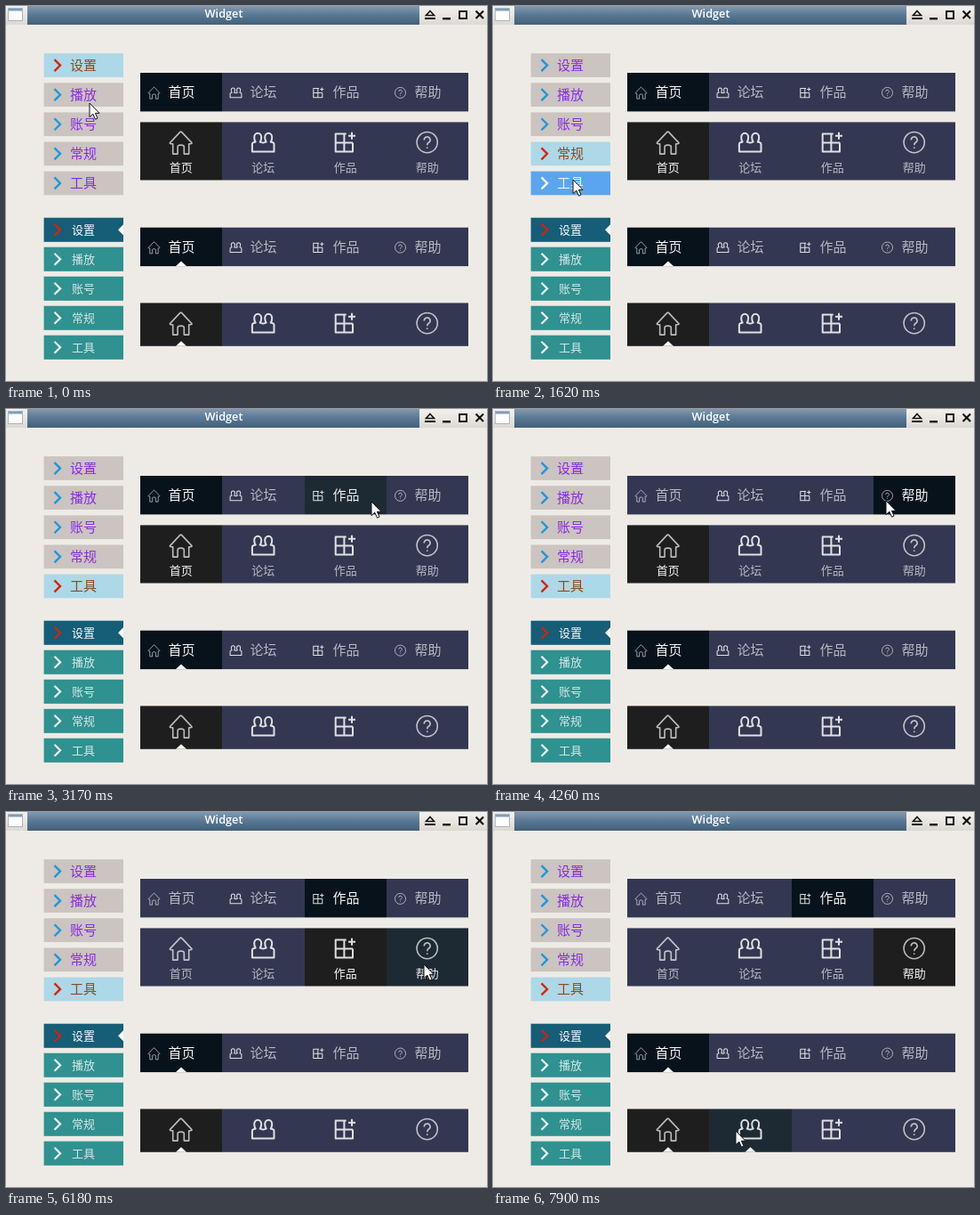
Recreate the animation shown at these times as an HTML page with a canvas. Size 541 by 421 pixels, loop 8 s.

```html
<!DOCTYPE html>
<html lang="zh-CN">
<head>
<meta charset="utf-8">
<title>Widget</title>
<style>
html, body { margin: 0; width: 100%; height: 100%; overflow: hidden; background: #eeebe6; }
canvas { display: block; }
</style>
</head>
<body>
<canvas id="stage" width="541" height="421"></canvas>
<script>
const ctx = document.getElementById('stage').getContext('2d');
const LOOP = 8000, STEP = 77.4, PHASE = 13;
const CLICK_DELAY = 2; // steps between arriving and the press taking effect
const CJK = '"Noto Sans CJK SC", "Noto Sans CJK", "Noto Sans CJK JP", sans-serif';
const NOTCH = '#fbfaf8';

const LIST = ['设置', '播放', '账号', '常规', '工具'];
const MENU = ['首页', '论坛', '作品', '帮助'];

// Icons live in a box of about 26 units around the origin
const soft = 'rgba(255,255,255,.7)', bright = 'rgba(255,255,255,.85)';
const ICONS = [
  { ink: soft, width: 1.6, d: 'M-12.3 .5L-1 -11.5Q0 -12.4 1 -11.5L12.3 .5Q12.6 1.8 9 1.8V13H3.6V5Q3.6 3 0 3Q-3.6 3 -3.6 5V13H-9V1.8Q-12.6 1.8 -12.3 .5Z' },
  { ink: bright, width: 2, d: 'M-12.3 10.3V2Q-12.3 .5 -11 .2L-8.5 -.5Q-10 -2.5 -10 -5.5A4 4.8 0 0 1 -2 -5.5Q-2 -2.5 -3.5 -.5L0 .5L3.5 -.5Q2 -2.5 2 -5.5A4 4.8 0 0 1 10 -5.5Q10 -2.5 8.5 -.5L11 .2Q12.3 .5 12.3 2V10.3Z' },
  { ink: bright, width: 2, d: 'M1 -9.5H-11V10.3H8.3V.3M-1.3 -9.5V10.3M-11 .3H8.3M7.3 -11.3V-3.3M3.3 -7.3H11.3' },
  { ink: soft, width: 1.6, d: 'M11.6 0A11.6 11.6 0 1 1 -11.6 0A11.6 11.6 0 1 1 11.6 0M-3.4 -2.6A3.4 3.4 0 1 1 1.6 .2Q0 1.2 0 3.2M0 5.4V7' }
].map(icon => ({ ...icon, path: new Path2D(icon.d) }));
const ARROW = new Path2D('M0 0V15.6L3.8 12.2L6.5 18.2L9 17L6.4 11.3H11Z');

// Style arrays run: idle, hovered, selected
const TEXT = ['#b7b9c4', '#ecedef', '#f4f5f6'];
const BLUE = ['#333751', '#1e2a33', '#07121b'];
const GREY = ['#333751', '#1e2a33', '#1e1e1e'];

function list(y, h, pitch, style) {
  const cells = LIST.map((text, i) => ({ text, x: 42.6, y: y + i * pitch, w: 89.4, h }));
  return { cells, picks: [], draw: drawListItem, ...style };
}

function bar(y, h, layout, bg, notch) {
  const edge = i => 151 + Math.round(i * 92.25);
  const cells = MENU.map((text, i) => ({ text, x: edge(i), y, w: edge(i + 1) - edge(i), h }));
  return { cells, picks: [], draw: drawBarItem, layout, bg, notch };
}

const PANELS = [
  list(53.2, 26.7, 33.1, {
    size: 15, indent: 29.4, bg: ['#cbc4c0', '#5ba5ef', '#add8e8'],
    ink: ['#8a2be2', '#f0f0f5', '#8b4a20'], chevron: ['#1f97dc', '#f4f6fa', '#d9240c']
  }),
  list(237.7, 27.1, 33, {
    size: 13, indent: 31.4, notch: true, bg: ['#2f9190', '#1d7a86', '#165d77'],
    ink: ['#d5e8e6', '#ffffff', '#ffffff'], chevron: ['#e8f3f2', '#ffffff', '#d3220f']
  }),
  bar(75, 43.4, 'row', BLUE),
  bar(130.4, 65.1, 'stack', GREY),
  bar(248.7, 43.4, 'row', BLUE, true),
  bar(333.4, 48.4, 'icon', GREY, true)
];

// Pointer glides: leave step, arrive step, x, y, then whether it clicks there
const CLICK = true;
const GLIDES = [
  [-1, 0, 94, 109, CLICK],
  [2, 5, 92, 128, CLICK],
  [7, 12, 91, 169, CLICK],
  [14, 20, 90, 195, CLICK],
  [22, 31, 300, 98],
  [37, 41, 411, 104],
  [43, 45, 398, 104],
  [46, 51, 442, 103, CLICK],
  [55, 59, 392, 98, CLICK],
  [60, 66, 294, 171],
  [69, 70, 293, 173, CLICK],
  [72, 75, 375, 158, CLICK],
  [77, 81, 471, 171, CLICK],
  [83, 88, 371, 277],
  [91, 94, 460, 354],
  [94, 97, 218, 346],
  [97, 99, 250, 346],
  [100, 102, 273, 358]
];

const easeOut = f => 1 - (1 - f) ** 3;

function pointer(n) {
  let x = 94, y = 84;
  for (const [leave, arrive, tx, ty] of GLIDES) {
    if (n <= leave) break;
    const f = easeOut(Math.min(1, (n - leave) / (arrive - leave)));
    x += (tx - x) * f;
    y += (ty - y) * f;
  }
  return [Math.round(x), Math.round(y)];
}

const inside = (c, [x, y]) => x >= c.x && x < c.x + c.w && y >= c.y && y < c.y + c.h;

// Every click selects the item beneath it
for (const [, arrive, x, y, click] of GLIDES) {
  if (!click) continue;
  for (const panel of PANELS) {
    const item = panel.cells.findIndex(c => inside(c, [x, y]));
    if (item >= 0) panel.picks.push({ at: arrive + CLICK_DELAY, item });
  }
}

function selected(panel, n) {
  const done = panel.picks.filter(p => p.at <= n);
  return done.length ? done[done.length - 1].item : 0;
}

function rect(x, y, w, h, fill) {
  ctx.fillStyle = fill;
  ctx.fillRect(x, y, w, h);
}

function trace(points) {
  ctx.beginPath();
  points.forEach(([x, y]) => ctx.lineTo(x, y));
}

function poly(points, fill) {
  trace(points);
  ctx.fillStyle = fill;
  ctx.fill();
}

function line(points, color, width, close) {
  trace(points);
  if (close) ctx.closePath();
  ctx.strokeStyle = color;
  ctx.lineWidth = width;
  ctx.stroke();
}

function label(text, x, cy, size, color, align = 'left') {
  ctx.font = `${size}px ${CJK}`;
  ctx.textAlign = align;
  ctx.fillStyle = color;
  ctx.fillText(text, x, cy + size * 0.35);
}

function drawIcon({ path, ink, width }, x, y, scale) {
  ctx.save();
  ctx.translate(x, y);
  ctx.scale(scale, scale);
  ctx.lineJoin = 'round';
  ctx.lineWidth = width;
  ctx.strokeStyle = ink;
  ctx.stroke(path);
  ctx.restore();
}

function shade(...colors) {
  const g = ctx.createLinearGradient(0, 0, 0, 21);
  colors.forEach((c, i) => g.addColorStop(i / (colors.length - 1), c));
  return g;
}

function titleBar() {
  rect(0, 0, 541, 21, shade('#f3f1ed', '#e9e6e1', '#dcd8d2'));
  rect(24, 0, 441, 21, shade('#8299b0', '#587793', '#426079'));
  rect(2, 2, 17, 15, '#a9b5c2');
  rect(3, 3, 15, 13, '#ffffff');
  rect(3, 3, 15, 2.5, '#7f9cbd');
  ctx.font = '600 12.7px "Open Sans", "Noto Sans", sans-serif';
  ctx.textAlign = 'center';
  ctx.fillStyle = '#ffffff';
  ctx.fillText('Widget', 245, 13);
  const ink = '#111';
  line([[477, 5.5], [481.5, 10.5], [472.5, 10.5]], ink, 1.6, true);
  rect(471, 13, 12, 2, ink);
  rect(491, 13, 9, 2.4, ink);
  line([[510, 6], [518, 6], [518, 14], [510, 14]], ink, 2, true);
  line([[528.5, 5.5], [537, 14]], ink, 2.2);
  line([[537, 5.5], [528.5, 14]], ink, 2.2);
}

function drawListItem(panel, { text, x, y, w, h }, i, s) {
  const cy = y + h / 2, right = x + w;
  rect(x, y, w, h, panel.bg[s]);
  line([[54.5, cy - 6.5], [61, cy], [54.5, cy + 6.5]], panel.chevron[s], 2.4);
  label(text, x + panel.indent, cy, panel.size, panel.ink[s]);
  if (panel.notch && s) poly([[right, cy - 6], [right - 6, cy], [right, cy + 6]], NOTCH);
}

function drawBarItem(panel, { text, x, y, w, h }, i, s) {
  const mid = x + w / 2, bottom = y + h;
  rect(x, y, w, h, panel.bg[s]);
  if (panel.layout === 'row') {
    drawIcon(ICONS[i], x + 15.5, y + 22.4, 0.52);
    label(text, x + 31.5, y + 22, 15, TEXT[s]);
  } else {
    drawIcon(ICONS[i], mid - 0.3, y + 22.7, 1);
    if (panel.layout === 'stack') label(text, mid - 0.3, y + 51, 13, TEXT[s], 'center');
  }
  if (panel.notch && s) poly([[mid - 6, bottom], [mid, bottom - 5.5], [mid + 6, bottom]], NOTCH);
}

function drawPointer([x, y]) {
  ctx.save();
  ctx.translate(x, y);
  ctx.fillStyle = '#fff';
  ctx.strokeStyle = '#111';
  ctx.lineWidth = 1;
  ctx.fill(ARROW);
  ctx.stroke(ARROW);
  ctx.restore();
}

function draw(t) {
  const n = Math.floor((t + PHASE) / STEP);
  const hover = pointer(n - 1); // highlights trail the pointer by one step
  rect(0, 0, 541, 421, '#eeebe6');
  titleBar();
  for (const panel of PANELS) {
    const on = selected(panel, n);
    panel.cells.forEach((cell, i) => {
      const state = i === on ? 2 : inside(cell, hover) ? 1 : 0;
      panel.draw(panel, cell, i, state);
    });
  }
  drawPointer(pointer(n));
}

const start = performance.now();
function tick() {
  draw((performance.now() - start) % LOOP);
  requestAnimationFrame(tick);
}
tick();
</script>
</body>
</html>
```
